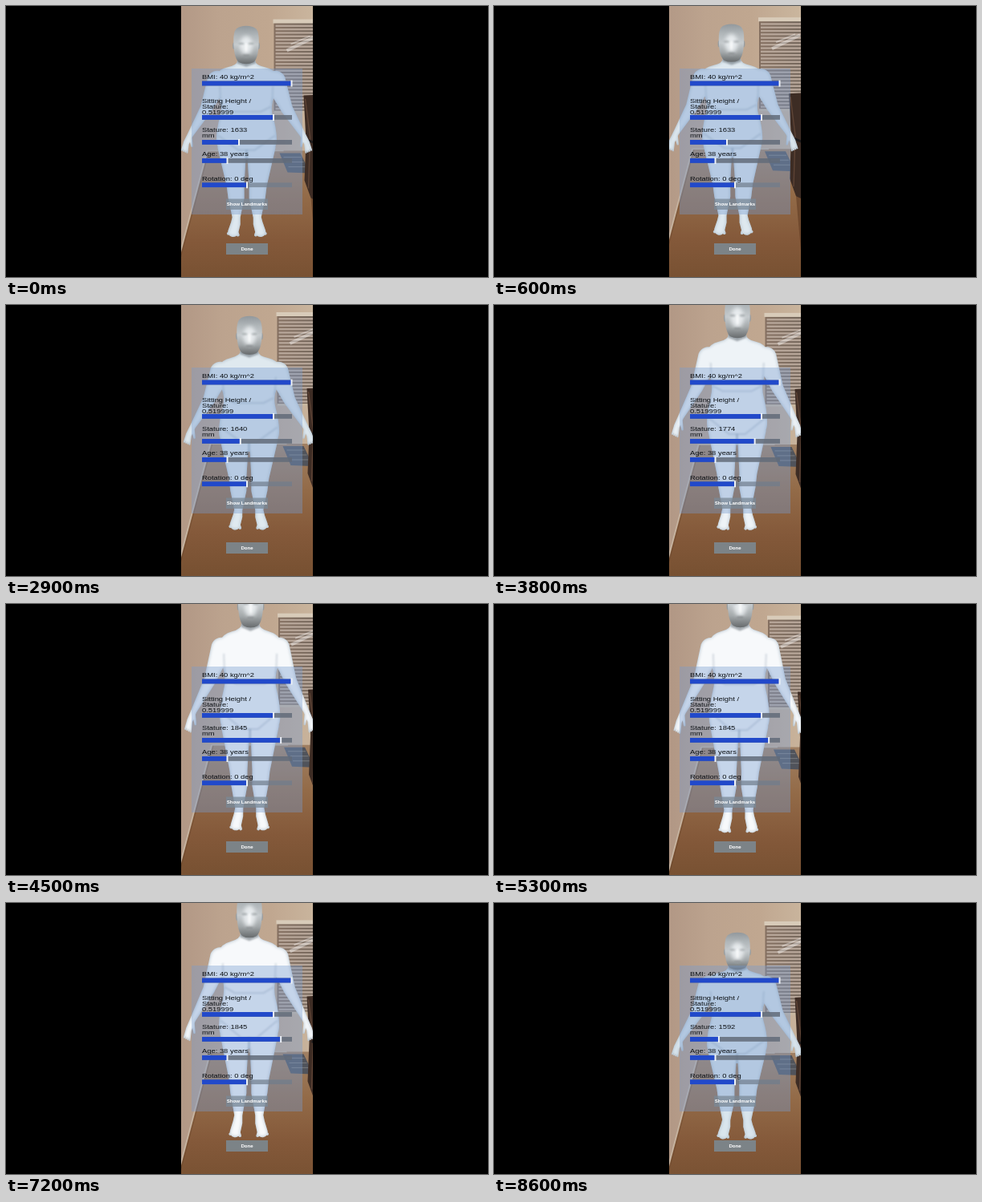
Animation, 600 px wide and 338 px high, one loop 8700 ms. Source, as an HTML page with a canvas:

```html
<!DOCTYPE html>
<html lang="en">
<head>
<meta charset="utf-8">
<title>Body size viewer</title>
<style>
html, body { margin: 0; width: 100%; height: 100%; overflow: hidden; background: #000; }
canvas { display: block; }
</style>
</head>
<body>
<canvas id="stage" width="600" height="338"></canvas>
<script>
const ctx = document.getElementById('stage').getContext('2d');
const LOOP = 8700, STEP = 100;
const SANS = '"Liberation Sans", Arial, sans-serif';

// Sideways drift of the hand-held camera: seconds, head x
const DRIFT = [[0, 299], [.6, 295.5], [2, 303], [3.8, 303], [5.3, 306.5], [7.2, 303], [8.6, 303]];

function ease(from, to, s) {
  const p = Math.max(0, Math.min(1, (s - from) / (to - from)));
  return p * p * (3 - 2 * p);
}

function pose(s) {
  const headX = DRIFT.slice(1).reduce((x, [t, v], i) => x + (v - DRIFT[i][1]) * ease(DRIFT[i][0], t, s), DRIFT[0][1]);
  const stature = 1633 + 212 * ease(2.7, 4.5, s) - 253 * ease(7.2, 8.4, s);
  const zoom = .1603 + .0088 * Math.exp(-(((s - 5.5) / 1.9) ** 2));
  return {
    headX, stature,
    footX: 301 + .6 * (headX - 301),
    footY: 286 - 7 * Math.cos(2 * Math.PI * (s - 2.9) / 11),
    height: stature * zoom
  };
}

function rect(x, y, w, h, color) {
  ctx.fillStyle = color;
  ctx.fillRect(x, y, w, h);
}

function trace(points) {
  ctx.beginPath();
  points.forEach(p => ctx.lineTo(...p));
}

function poly(points, color) {
  trace(points);
  ctx.fillStyle = color;
  ctx.fill();
}

function line(points, color, width) {
  trace(points);
  ctx.strokeStyle = color;
  ctx.lineWidth = width;
  ctx.stroke();
}

function ramp(x0, y0, x1, y1, ...colors) {
  const g = ctx.createLinearGradient(x0, y0, x1, y1);
  colors.forEach((c, i) => g.addColorStop(i / (colors.length - 1), c));
  return g;
}

// Closed soft curve through a half outline and its mirror image
function addMirrored(path, half, place) {
  const all = [...half, ...half.slice().reverse().map(([u, y]) => [-u, y])].map(p => place(...p));
  const mid = (a, b) => [(a[0] + b[0]) / 2, (a[1] + b[1]) / 2];
  path.moveTo(...mid(all[all.length - 1], all[0]));
  all.forEach((p, i) => path.quadraticCurveTo(...p, ...mid(p, all[(i + 1) % all.length])));
  path.closePath();
}

// Chain of tapered capsules; each joint is [x, y, radius]
function addLimb(path, joints) {
  for (let i = 1; i < joints.length; i++) {
    const [x0, y0, r0] = joints[i - 1], [x1, y1, r1] = joints[i];
    const a = Math.atan2(y1 - y0, x1 - x0), q = Math.PI / 2;
    path.moveTo(x1 + r1 * Math.cos(a - q), y1 + r1 * Math.sin(a - q));
    path.arc(x1, y1, r1, a - q, a + q);
    path.arc(x0, y0, r0, a + q, a + 3 * q);
    path.closePath();
  }
}

function drawRoom(dx, dy) {
  ctx.save();
  ctx.translate(dx, dy);
  rect(190, -20, 220, 380, ramp(205, 0, 385, 0, '#b09684', '#bca38e', '#c0a790', '#cab69e'));
  poly([[250, 177], [410, 177], [410, 370], [199, 370]], ramp(0, 177, 0, 345, '#a08063', '#936b48', '#84593a', '#765031'));
  line([[250, 177], [199, 370]], '#c6b4a1', 1.8);
  line([[252, 178], [201, 370]], 'rgba(84,55,33,.35)', 1);
  line([[250, 177], [345, 177]], '#c4b29c', 1.5);

  // Blinds with a glare streak
  rect(333, 14, 70, 115, ramp(333, 0, 382, 0, '#846f60', '#6f6257'));
  for (let y = 20; y < 126; y += 4.3) rect(335, y, 70, 2.5, '#b5a497');
  rect(332, 13, 70, 5, '#d8cbb9');
  rect(333, 127, 70, 3, '#c8b7a0');
  line([[349, 52], [384, 35]], 'rgba(255,255,255,.4)', 4);
  line([[354, 44], [378, 34]], 'rgba(255,255,255,.35)', 2);

  // Rug and chair
  poly([[340, 180], [366, 180], [378, 205], [350, 204]], '#50535b');
  for (let i = 0; i < 3; i++) line([[345 + i * 3, 185 + i * 6], [367 + i * 3, 185 + i * 6]], '#787a7d', 1);
  poly([[370, 108], [410, 106], [410, 250], [379, 236], [371, 214], [373, 165]], '#3d2c24');
  line([[372, 112], [378, 160], [376, 224]], '#5d4335', 1.4);
  line([[376, 164], [410, 178]], '#1e1b1c', 3);
  poly([[379, 236], [410, 248], [410, 360], [390, 360]], 'rgba(76,43,24,.45)');
  ctx.restore();
}

function figurePath(at) {
  const path = new Path2D();
  const torso = [[11, 60], [11, 72], [35, 77], [42, 95], [29, 123], [37, 150], [38, 178], [12, 190]];
  addMirrored(path, torso, at);
  for (const side of [-1, 1]) {
    const limb = (...joints) => addLimb(path, joints.map(([u, y, r]) => [...at(u * side, y), r]));
    limb([36, 92, 13], [50, 126, 7.5], [70, 159, 3.6], [75, 169, 3.6]);
    limb([70, 161, 2], [68, 173, 1.2]);
    for (let i = 0; i < 4; i++) limb([73 + i * 1.4, 169, 1.4], [74 + i * 2.2, 181 - i, 1]);
    limb([18, 174, 18], [14, 222, 11], [13, 238, 10], [13, 262, 5], [14, 270, 6], [17, 280, 6.5]);
    for (let i = 0; i < 4; i++) limb([14, 276, 2], [11 + i * 4, 284 - i * .6, 1.8]);
  }
  return path;
}

function drawHead(at, x) {
  const top = at(0, 23)[1], h = at(0, 70)[1] - top;
  const blob = (u, f, rx, ry, color) => {
    ctx.beginPath();
    ctx.ellipse(x + u, top + h * f, rx, ry * h, 0, 0, Math.PI * 2);
    ctx.fillStyle = color;
    ctx.fill();
  };
  for (const side of [-1, 1]) blob(15.2 * side, .53, 1.7, .09, '#989da0');
  const skull = new Path2D();
  addMirrored(skull, [[8, 0], [16, .15], [15.5, .68], [11.5, .94], [5, 1.01]], (u, f) => [x + u, top + h * f]);
  ctx.save();
  ctx.clip(skull);
  rect(x - 18, top - 2, 36, h + 4, ramp(0, top, 0, top + h, '#92989c', '#b0b6b9', '#c5cacd', '#a3a8aa', '#696d6f'));
  ctx.filter = 'blur(2.5px)';
  blob(0, .52, 8, .25, 'rgba(238,242,244,.85)');
  ctx.filter = 'blur(1px)';
  for (const side of [-1, 1]) blob(6 * side, .47, 3.5, .025, 'rgba(105,112,116,.45)');
  blob(0, .57, 1.6, .12, 'rgba(255,255,255,.7)');
  blob(0, .78, 4.5, .02, 'rgba(85,90,93,.5)');
  ctx.restore();
}

function drawFigure({ headX, footX, footY, height, stature }) {
  const at = (u, y) => {
    const f = (y - 23) / 262;
    return [headX + (footX - headX) * f + u, footY - height + f * height];
  };
  const body = figurePath(at);
  const light = 89 + (stature - 1592) * .034;
  ctx.save();
  ctx.clip(body);
  rect(200, -60, 200, 420, '#a9b8c4');
  ctx.filter = 'blur(2px)';
  ctx.fillStyle = `hsl(205 35% ${light}%)`;
  ctx.fill(body);
  const crease = (points, alpha) => line(points.map(p => at(...p)), `rgba(90,112,135,${alpha})`, 2);
  ctx.filter = 'blur(1px)';
  crease([[-30, 124], [-18, 130], [18, 130], [30, 124]], .25);
  crease([[-35, 160], [-10, 178], [10, 178], [35, 160]], .25);
  crease([[0, 178], [0, 215]], .5);
  for (const side of [-1, 1]) crease([[33 * side, 98], [32 * side, 120]], .22);
  poly([at(-14, 60), at(14, 60), at(11, 70), at(0, 74), at(-11, 70)], 'rgba(80,90,98,.5)');
  ctx.restore();
  drawHead(at, headX);
}

// Panel type is 1.38 times wider than tall.
function label(y, ...lines) {
  ctx.save();
  ctx.translate(244, y);
  ctx.scale(1.38, 1);
  ctx.font = '6.8px ' + SANS;
  ctx.textAlign = 'left';
  ctx.textBaseline = 'alphabetic';
  ctx.fillStyle = '#0c1014';
  lines.forEach((s, i) => ctx.fillText(s, 0, i * 7));
  ctx.restore();
}

function slider(y, x, track = 'rgba(98,108,121,.85)') {
  rect(244, y, 112, 5.8, track);
  rect(244, y, x - 244, 5.8, '#2149ca');
  rect(x - 1, y - 1, 2, 8, '#eef2f6');
}

function button(text, y, h, color) {
  rect(274, y, 52, h, color);
  ctx.font = 'bold 6.1px ' + SANS;
  ctx.textAlign = 'center';
  ctx.textBaseline = 'middle';
  ctx.fillStyle = '#fff';
  ctx.fillText(text, 300, y + h / 2 + .3);
}

function drawPanel(stature) {
  rect(231, 78, 138, 182, 'rgba(120,155,205,.39)');
  label(90.6, 'BMI: 40 kg/m^2');
  slider(93.6, 355.5);
  label(120.9, 'Sitting Height /', 'Stature:', '0.519999');
  slider(136, 333);
  label(157.1, 'Stature: ' + Math.round(stature), 'mm');
  slider(167, 290 + (stature - 1633) * .246);
  label(187.2, 'Age: 38 years');
  slider(190, 275.5);
  label(217.5, 'Rotation: 0 deg');
  slider(220.3, 300, 'rgba(112,124,140,.7)');
  button('Show Landmarks', 240.5, 13.5, 'rgba(122,137,150,.75)');
  button('Done', 296, 14, '#7c8387');
}

function draw(t) {
  const now = pose(t / 1000);
  rect(0, 0, 600, 338, '#000');
  ctx.save();
  ctx.beginPath();
  ctx.rect(218, 0, 164, 338);
  ctx.clip();
  drawRoom(now.headX - 298.5, now.footY - 283);
  drawFigure(now);
  drawPanel(now.stature);
  ctx.restore();
}

function tick() {
  const t = performance.now() % LOOP;
  draw(Math.floor(t / STEP) * STEP);
  requestAnimationFrame(tick);
}
tick();
</script>
</body>
</html>
```
